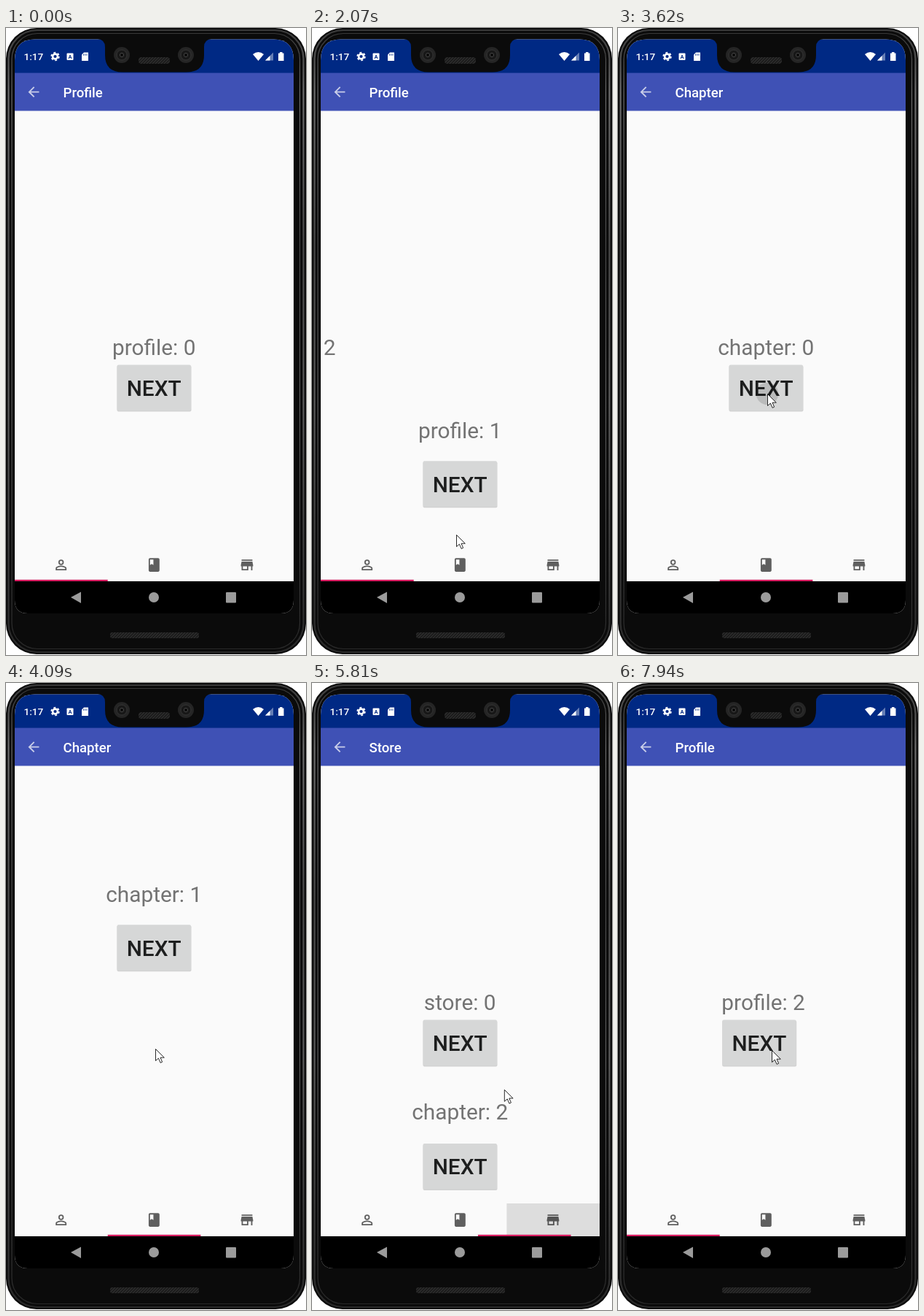
An HTML page for the animation above (8000 ms loop, 412x859 px).

```html
<!DOCTYPE html>
<html lang="en">
<head>
<meta charset="utf-8">
<title>Tab navigation</title>
<style>
  html, body { margin: 0; width: 100%; height: 100%; overflow: hidden; background: #fff; }
  svg { display: block; width: 412px; height: 859px; font-family: Roboto, sans-serif; }
  .label, .next { font-size: 29.8px; text-anchor: middle; }
  .label { fill: #737373; }
  .next { fill: #1d1e1e; font-weight: 500; }
</style>
</head>
<body>
<svg viewBox="0 0 412 859">
  <defs>
    <clipPath id="screen"><path d="M12 44Q12 15.5 40 15.5H367Q395 15.5 395 44V784Q395 802 377 802H30Q12 802 12 784Z"/></clipPath>
    <clipPath id="content"><rect x="12" y="113" width="383" height="600"/></clipPath>
    <clipPath id="tab"><rect id="tabBox" y="713" width="128" height="45"/></clipPath>
    <clipPath id="press"><rect x="153" y="462" width="101" height="62" rx="2"/></clipPath>
    <linearGradient id="edge" x2="0" y2="1">
      <stop offset="0" stop-color="#3a3a3a"/><stop offset=".1" stop-color="#6c6c6c"/>
      <stop offset=".35" stop-color="#484848"/><stop offset=".6" stop-color="#5c5c5c"/>
      <stop offset="1" stop-color="#282828"/>
    </linearGradient>
    <pattern id="mesh" width="4" height="4" patternUnits="userSpaceOnUse">
      <rect width="4" height="4" fill="#292929"/><path d="M0 4L4 0" stroke="#111"/>
    </pattern>
    <g id="camera">
      <circle r="11" fill="#252525"/><circle r="7" fill="#181818" stroke="#343434"/>
      <circle r="2.6" fill="#0a0a0a" stroke="#454545"/>
    </g>
  </defs>

  <!-- phone body -->
  <rect y="0" width="412" height="858" rx="42" fill="#0b0b0b"/>
  <g fill="none" stroke="url(#edge)">
    <rect x="3.5" y="3" width="405" height="852" rx="39" stroke-width="2.2"/>
    <rect x="8" y="7.5" width="395.5" height="843" rx="35" stroke-width="1.2"/>
  </g>
  <rect x="143" y="828" width="122" height="8" rx="3" fill="url(#mesh)"/>

  <!-- screen -->
  <g clip-path="url(#screen)">
    <rect x="12" y="15" width="383" height="787" fill="#fafafa"/>
    <rect x="12" y="15" width="383" height="47" fill="#002984"/>
    <rect x="12" y="61.5" width="383" height="52" fill="#3f51b5"/>
    <rect x="12" y="758" width="383" height="45"/>
  </g>
  <path d="M126 15Q136 16 136 26V37Q136 60.5 160 60.5H248Q272 60.5 272 37V26Q272 16 282 15Z" fill="#0b0b0b"/>
  <use href="#camera" x="159" y="37"/>
  <use href="#camera" x="247" y="37"/>
  <rect x="182" y="40" width="43" height="9" rx="4" fill="url(#mesh)"/>

  <!-- status bar -->
  <g fill="#fff">
    <text x="24.5" y="44" font-size="13.6" font-weight="500">1:17</text>
    <circle cx="67.5" cy="39" r="3.4" fill="none" stroke="#fff" stroke-width="2.6"/>
    <circle cx="67.5" cy="39" r="5.3" fill="none" stroke="#fff" stroke-width="1.8" stroke-dasharray="2.8 2.75"/>
    <rect x="83.5" y="34.5" width="9" height="9.5" rx="1"/>
    <text x="88" y="42" font-size="7.5" font-weight="700" text-anchor="middle" style="fill:#002984">A</text>
    <path d="M107 33.5H113V45H104V36.5Z"/>
    <path d="M106.6 35.5v2.2M108.8 35.5v2.2M111 35.5v2.2" stroke="#002984" stroke-width=".9"/>
    <path d="M339 36Q346.5 30 354 36L346.5 45Z"/>
    <path d="M356 44.5L367 33.5V44.5Z" opacity=".4"/>
    <path d="M356 44.5L362.5 38V44.5Z"/>
    <path d="M374 34.5H376V33H379.5V34.5H381.5V45H374Z"/>
  </g>

  <!-- toolbar -->
  <path transform="translate(26.8 76.5) scale(.93)" fill="#c9cee9"
    d="M20 11H7.83l5.59-5.59L12 4l-8 8 8 8 1.41-1.41L7.83 13H20z"/>
  <text id="title" x="78.6" y="94.7" font-size="18.6" font-weight="500" fill="#fff"></text>

  <g id="pages" clip-path="url(#content)"></g>
  <g clip-path="url(#press)"><circle id="pressDot" r="0"/></g>

  <!-- tabs -->
  <g fill="#5f5f5f" fill-rule="evenodd">
    <path transform="translate(64.5 724.5) scale(.93)" d="M12 5.9a2.1 2.1 0 1 1 0 4.2a2.1 2.1 0 0 1 0-4.2zM12 14.9c2.97 0 6.1 1.46 6.1 2.1v1.1H5.9V17c0-.64 3.13-2.1 6.1-2.1zM12 4a4 4 0 1 0 0 8a4 4 0 0 0 0-8zm0 9c-2.67 0-8 1.34-8 4v3h16v-3c0-2.66-5.33-4-8-4z"/>
    <path transform="translate(192.2 724.5) scale(.93)" d="M18 2H6c-1.1 0-2 .9-2 2v16c0 1.1.9 2 2 2h12c1.1 0 2-.9 2-2V4c0-1.1-.9-2-2-2zM6 4h5v8l-2.5-1.5L6 12z"/>
    <path transform="translate(319.8 724.5) scale(.93)" d="M20 4H4v2h16zM21 14v-2l-1-5H4l-1 5v2h1v6h10v-6h4v6h2v-6zm-9 4H6v-4h6z"/>
  </g>
  <g clip-path="url(#tab)"><circle id="tabDot" r="0"/></g>
  <rect id="bar" y="755.8" width="127.7" height="2.2" fill="#d81b60"/>

  <!-- system navigation -->
  <g fill="#9b9b9b">
    <path d="M89 780L103 772.5V788Z"/>
    <circle cx="203" cy="780" r="7"/>
    <rect x="302" y="773" width="14" height="14.5" rx="1"/>
  </g>
  <path id="cursor" d="M.5 .5V16.5L4.4 13.1L7.1 19.3L9.6 18.2L7 12.2H12.3Z" fill="#fff" stroke="#111" stroke-width=".9"/>
</svg>
<script>
const LOOP = 8000, SLIDE = 700, TAB = 127.7;
const $ = id => document.getElementById(id);
const clamp = v => Math.min(1, Math.max(0, v));
const set = (el, attrs) => { for (const k in attrs) el.setAttribute(k, attrs[k]); };

// Entry sides: travel vector and how long the button trails the label.
const sides = {
  left: { x: -383, y: 0, lag: 41 },
  right: { x: 383, y: 0, lag: 22 },
  top: { x: 0, y: -600, lag: -22 },
};
// Pages without a side appear at once; those without a fall time vanish at once.
const pages = [
  { label: 'profile: 0', from: 0, to: 880 },
  { label: 'profile: 1', from: 900, side: 'left', to: 1765, fall: SLIDE },
  { label: 'profile: 2', from: 1911, side: 'left', to: 2950, fall: 450 },
  { label: 'chapter: 0', from: 2960, to: 3700 },
  { label: 'chapter: 1', from: 3739, side: 'top', to: 4570, fall: SLIDE },
  { label: 'chapter: 2', from: 4620, side: 'top', to: 5461, fall: SLIDE },
  { label: 'store: 0', from: 5480, to: 6400 },
  { label: 'store: 1', from: 6420, side: 'right', to: 7280, fall: SLIDE },
  { label: 'profile: 2', from: 7309, side: 'left', to: Infinity },
];
const titles = [[0, 'Profile'], [2960, 'Chapter'], [5480, 'Store'], [7280, 'Profile']];
const barMoves = [[2950, 350, 1], [5546, 600, 1], [7290, 600, -2]];
const presses = [[680, 197, 489], [1690, 197, 489], [3620, 205, 501], [4500, 205, 501], [6330, 210, 495]];
// start, tab, x, y, fade start, fade length
const tabTaps = [[2760, 1, 202, 735, 3000, 300], [5350, 2, 344, 741, 5560, 500], [7150, 0, 73, 749, 7390, 400]];
const path = [
  [70, 312, 780], [370, 197, 489], [1780, 197, 489], [2070, 198, 694], [2460, 198, 716],
  [2610, 198, 724], [2960, 198, 724], [3300, 205, 501], [4640, 205, 501], [5270, 344, 741],
  [5560, 344, 741], [5810, 264, 557], [6100, 210, 495], [6480, 210, 495], [7000, 72, 749],
  [7400, 72, 749], [7800, 211, 503],
];

for (const p of pages) {
  const g = document.createElementNS('http://www.w3.org/2000/svg', 'g');
  g.innerHTML = `<text class="label" x="203.2" y="447.8">${p.label}</text><g>
    <rect x="152.5" y="462.5" width="102" height="63" rx="2" opacity=".16"/>
    <rect x="152.5" y="461.5" width="101.5" height="62.5" rx="2" fill="#d6d7d7"/>
    <text class="next" x="203.2" y="504">NEXT</text></g>`;
  $('pages').append(g);
  p.el = g;
}

function offset(p, t, isButton) {
  const out = t - p.to + (isButton ? 22 : 0);
  if (p.fall && out > 0) return [0, 600 * (out / p.fall) ** 2];
  if (!p.side) return [0, 0];
  const { x, y, lag } = sides[p.side];
  const left = (1 - clamp((t - p.from - (isButton ? lag : 0)) / SLIDE)) ** 2;
  return [x * left, y * left];
}

// Cubic Bezier (.4, 0, .2, 1), solved by bisection.
function fastOutSlowIn(x) {
  let lo = 0, hi = 1, u;
  for (let i = 0; i < 20; i++) {
    u = (lo + hi) / 2;
    const bx = 1.2 * u * (1 - u) ** 2 + .6 * u * u * (1 - u) + u ** 3;
    if (bx < x) lo = u; else hi = u;
  }
  return u * u * (3 - 2 * u);
}

function cursorAt(t) {
  const i = path.findIndex(k => k[0] > t);
  if (i < 0) return path[path.length - 1].slice(1);
  const [t0, x0, y0] = path[i - 1], [t1, x1, y1] = path[i];
  const k = (t - t0) / (t1 - t0);
  return [x0 + (x1 - x0) * k, y0 + (y1 - y0) * k];
}

function draw(t) {
  for (const p of pages) {
    const shown = t >= p.from - 22 && t < p.to + (p.fall || 0);
    p.el.style.display = shown ? '' : 'none';
    if (!shown) continue;
    [...p.el.children].forEach((el, i) => set(el, { transform: `translate(${offset(p, t, i === 1)})` }));
  }
  $('title').textContent = titles.filter(k => k[0] <= t).pop()[1];

  let tab = 0;
  for (const [start, length, step] of barMoves)
    if (t > start) tab += step * fastOutSlowIn(clamp((t - start) / length));
  set($('bar'), { x: 12 + TAB * tab });

  const press = presses.find(([s]) => t >= s && t < s + 200);
  set($('pressDot'), press
    ? { cx: press[1], cy: press[2], r: 15 + (t - press[0]) * .3, opacity: .13 }
    : { r: 0 });

  const tap = tabTaps.find(([s, , , , f, d]) => t >= s && t < f + d);
  if (tap) {
    const [start, i, cx, cy, fade, length] = tap;
    set($('tabBox'), { x: 12 + TAB * i });
    set($('tabDot'), { cx, cy, r: 15 + (t - start) * .29, opacity: .24 * (1 - clamp((t - fade) / length)) });
  } else set($('tabDot'), { r: 0 });

  const visible = t >= path[0][0];
  $('cursor').style.display = visible ? '' : 'none';
  if (visible) set($('cursor'), { transform: `translate(${cursorAt(t)})` });
}

function tick() {
  draw(performance.now() % LOOP);
  requestAnimationFrame(tick);
}
tick();
</script>
</body>
</html>
```
